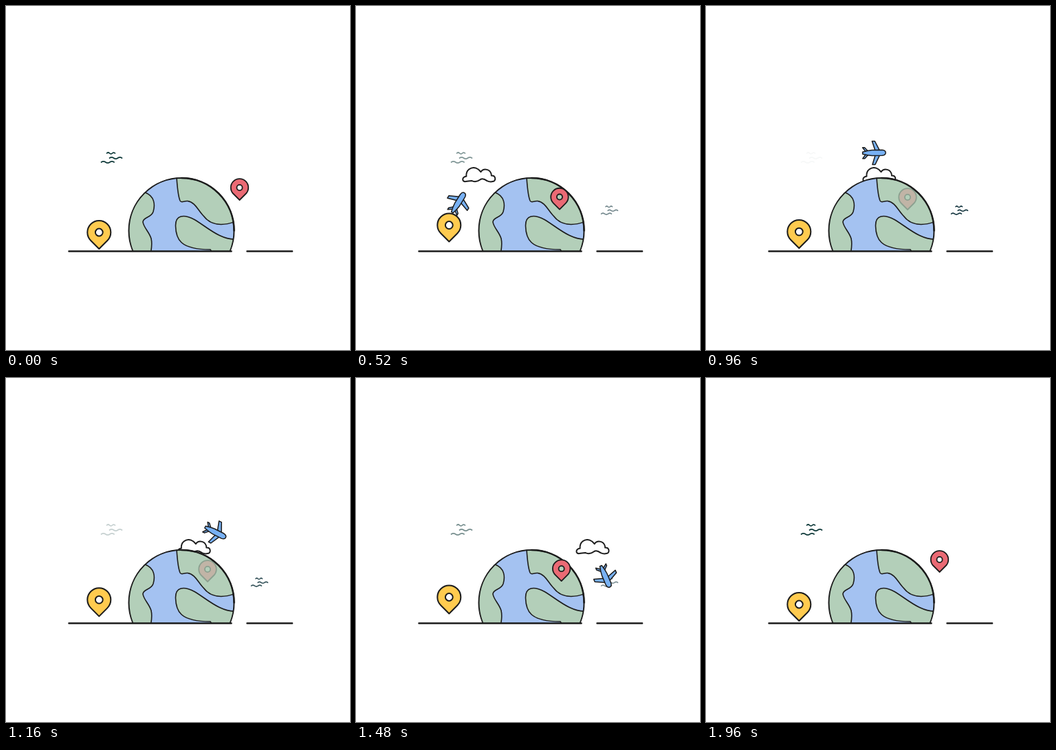
These frames come from a looping animation (500 by 500 pixels, 2 s). An HTML page:

```html
<!DOCTYPE html>
<html lang="en">
<head>
<meta charset="utf-8">
<title>Around the globe</title>
<style>
html, body { margin: 0; width: 100%; height: 100%; overflow: hidden; background: #fff; }
svg { display: block; width: 100vw; height: 100vh; }
</style>
</head>
<body>
<svg viewBox="0 0 500 500" fill="none" stroke="#1c1c1c" stroke-width="2" stroke-linecap="round" stroke-linejoin="round">
  <defs>
    <clipPath id="sky"><path d="M0 0H500V356.5H0z"/></clipPath>
    <clipPath id="disc"><circle cx="255" cy="326.5" r="77"/></clipPath>
    <path id="pin" fill-rule="evenodd" d="M0 24L-12 12A17 17 0 1 1 12 12zM5.4 0A5.4 5.4 0 1 0 -5.4 0A5.4 5.4 0 1 0 5.4 0z"/>
    <path id="gulls" d="M8 1.5q2-2 4 0t4 0t4 0M12 8.500q3-2.400 6 0t6 0t6 0M0 14.500q3.100-2.400 6.200 0t6.200 0t6.200 0"/>
  </defs>

  <use id="gullsL" href="#gulls" x="138.500" y="212.500" stroke="#123c3c" stroke-width="1.700"/>
  <use id="gullsR" href="#gulls" transform="translate(356.500 290.500) scale(.8)" stroke="#14363f"/>

  <path id="cloud" fill="#fff" d="M5 20.500C-.5 21 -1 14.500 6 13C5 4 13 -1.500 20 1C23 2 25 4 27 6.500C31 .5 42 2 42.500 12C49 11.500 49.500 20 44.500 20.500Q40 21.500 36 19.500C32 16.500 28 15.500 25 18.500C22 21 17 21 14 19.500Q9 20 5 20.500z"/>

  <g clip-path="url(#sky)">
    <circle cx="255" cy="326.5" r="77" fill="#a4c2f1" stroke="none"/>
    <g clip-path="url(#disc)" fill="#b3cfb9" stroke-width="1.600">
      <path d="M202 271C216 276 217 289 214 299C211 308 199 307 199 314C200 322 208 328 211 338C212.500 345 212 350 210.500 358H170V271z"/>
      <path d="M248 249C249 264 250 276 253 283C255 287 258 283 264 283.500C275 285 279 297 287 305C297 318.500 314 320.500 334 313V245z"/>
      <path d="M336 359V339C312 341 292 321 274 310.500C258 302 246 304 246.500 320C247 338 252 354 297 354L300 359z"/>
    </g>
    <circle cx="255" cy="326.500" r="76.500" stroke-width="2"/>
    <path d="M255 250A76.500 76.500 0 0 1 331.500 326.500" stroke-width="2.600"/>
    <g id="plane" fill="#78b1f4" stroke-width="1.500">
      <path d="M2 -3L-2.500 -17H1.500L8.500 -3zM2 3L-2.500 17H1.500L8.500 3zM-12 -2L-16.500 -8H-13.500L-8 -2zM-12 2L-16.500 8H-13.500L-8 2z"/>
      <path d="M-16.500 -1.500Q-9 -3.500 -3 -4H12Q17 -3.500 17 0Q17 3.500 12 4H-3Q-9 3.500 -16.500 1.500z"/>
    </g>
  </g>

  <path d="M91.500 356.500H327.500M350.500 356.500H416" stroke-width="2.600"/>
  <use id="yellow" href="#pin" fill="#ffcb4f"/>
  <use id="red" href="#pin" fill="#ea6a74" stroke-width="2.400"/>
</svg>
<script>
const LOOP = 2000, STEP = 40, SPAN = LOOP - STEP;
const el = id => document.getElementById(id);
const move = (id, transform) => el(id).setAttribute('transform', transform);
const fade = (id, a) => el(id).setAttribute('opacity', a);
const ramp = (t, a, b) => Math.min(1, Math.max(0, (t - a) / (b - a)));

function draw(t) {
  const near = Math.min(t, SPAN - t);   // time to the closer end of the loop
  const swing = 1 - 2 * near / SPAN;
  fade('gullsL', swing ** .85);
  fade('gullsR', (1 - swing) ** .85);

  // The cloud lingers at the top of the globe
  const u = t - 960, drift = Math.sign(u) * (Math.hypot(u, 200) - 200);
  move('cloud', `translate(${227.5 + .258 * drift} 234.6)`);
  fade('cloud', ramp(near, 80, 180));

  // The plane circles the globe, its nose close to the tangent
  const orbit = 112.4 * Math.sin((t - 995) * .00139), a = orbit * Math.PI / 180;
  const x = 255 + 114 * Math.sin(a), y = 327 - 114 * Math.cos(a);
  move('plane', `translate(${x} ${y}) rotate(${.9 * orbit + 4})`);
  fade('plane', ramp(near, 220, 320));

  const hop = 1 - Math.abs(4 * t / SPAN % 2 - 1) ** 2.2;
  move('yellow', `translate(135.3 ${329 - 10.5 * hop})`);

  // The red pin slides onto the globe, fades, then returns
  const s = Math.sin(ramp(near, 0, 620) * Math.PI / 2);
  move('red', `translate(${339.5 - 46.5 * s * s} ${264 + 14 * s}) scale(.75)`);
  fade('red', 1 - .74 * ramp(near, 540, 740));
}

const start = performance.now();
function tick() {
  const t = (performance.now() - start) % LOOP;
  draw(Math.floor(t / STEP) * STEP);
  requestAnimationFrame(tick);
}
tick();
</script>
</body>
</html>
```
